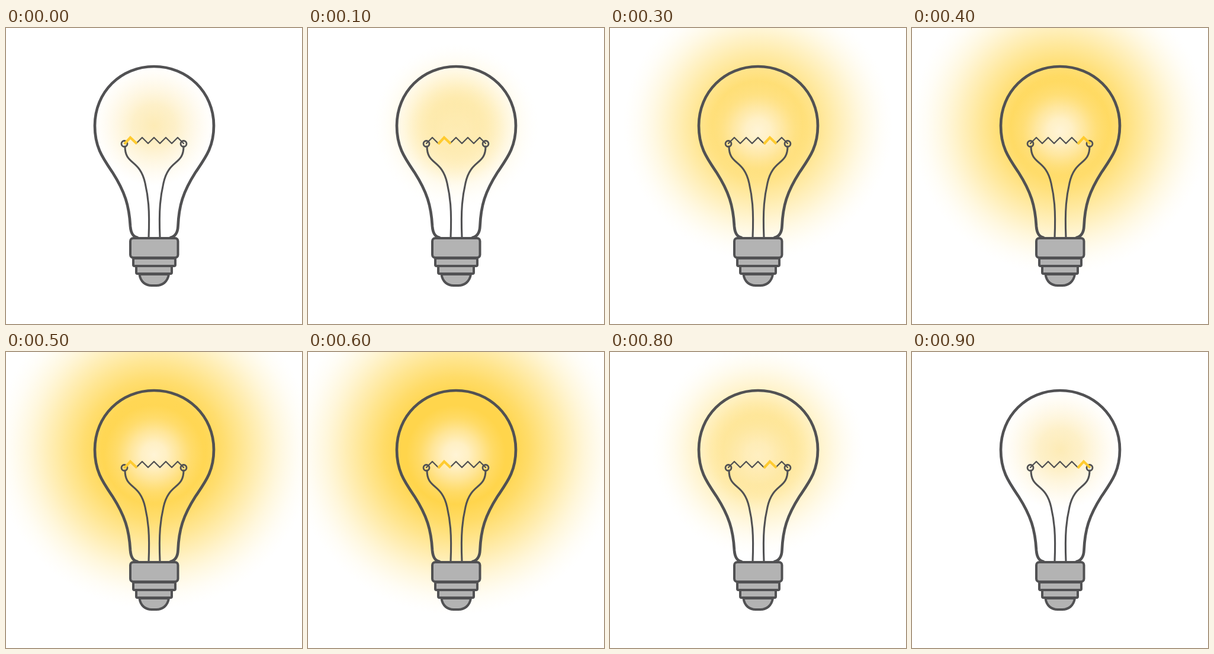
Write an HTML page that moves like this. It is 500 px wide and 500 px high and loops after 1000 ms.

```html
<!DOCTYPE html>
<html lang="en">
<head>
<meta charset="utf-8">
<title>Light bulb</title>
<style>
  html, body { margin: 0; width: 100%; height: 100%; overflow: hidden; background: #fff; }
  svg { display: block; width: 100%; height: 100%; }
  .line { fill: none; stroke: #515153; stroke-linecap: round; stroke-linejoin: round; }
  .base { fill: #b3b3b3; stroke: #515153; stroke-width: 4; stroke-linejoin: round; }
</style>
</head>
<body>
<svg viewBox="0 0 500 500">
  <defs>
    <radialGradient id="warm">
      <stop offset="0" stop-color="#fdeab2" stop-opacity=".95"/>
      <stop offset=".35" stop-color="#fdebb6" stop-opacity=".74"/>
      <stop offset=".7" stop-color="#feefc6" stop-opacity=".34"/>
      <stop offset="1" stop-color="#fff4d8" stop-opacity="0"/>
    </radialGradient>
    <radialGradient id="halo">
      <stop offset="0" stop-color="#ffd54c"/>
      <stop offset=".33" stop-color="#ffd54c"/>
      <stop offset=".44" stop-color="#ffd650" stop-opacity=".86"/>
      <stop offset=".55" stop-color="#ffd856" stop-opacity=".67"/>
      <stop offset=".66" stop-color="#ffda60" stop-opacity=".47"/>
      <stop offset=".78" stop-color="#ffdf74" stop-opacity=".26"/>
      <stop offset=".9" stop-color="#ffe690" stop-opacity=".09"/>
      <stop offset="1" stop-color="#fff0c0" stop-opacity="0"/>
    </radialGradient>
    <radialGradient id="core">
      <stop offset="0" stop-color="#fff4d6"/>
      <stop offset=".25" stop-color="#fff2ce" stop-opacity=".92"/>
      <stop offset=".5" stop-color="#ffefc4" stop-opacity=".62"/>
      <stop offset=".75" stop-color="#ffebb2" stop-opacity=".25"/>
      <stop offset="1" stop-color="#ffe8a4" stop-opacity="0"/>
    </radialGradient>
  </defs>

  <circle cx="250" cy="165" r="102" fill="url(#warm)"/>
  <circle id="glow" cx="250" cy="165" r="80" fill="url(#halo)" opacity="0"/>
  <circle id="heart" cx="250" cy="174" r="84" fill="url(#core)" opacity="0"/>

  <path class="line" stroke-width="4.7" d="M222 354C214 352 211 346 210 335C208 300 201 277 180 244C163 219 150 201 150 165C150 108 194 65 250 65C306 65 351 108 351 165C351 201 337 219 320 244C299 277 292 300 290.5 335C290 346 286 352 278 354"/>

  <g class="line" stroke-width="3.1">
    <path d="M201 200C201 232 226 221 235 262C240 284 243 305 241 354"/>
    <path d="M300 200C300 232 275 221 266 262C261 284 258 305 260 354"/>
    <circle cx="200" cy="195.5" r="5" stroke-width="2.8"/>
    <circle cx="300" cy="195.5" r="5" stroke-width="2.8"/>
  </g>

  <path class="line" stroke-width="2.3" d="M200 195l10-10 10 10 10-10 10 10 10-10 10 10 10-10 10 10 10-10 10 10"/>
  <path id="spark" d="M200 196l10-11 11 10.5" fill="none" stroke="#ffcb2f" stroke-width="4.2"/>

  <path class="base" d="M225.500 416C227 429 236 435 246 435H254C264 435 273 429 275 416Z"/>
  <rect class="base" x="220" y="402" width="60" height="13" rx="2"/>
  <rect class="base" x="215" y="389" width="71" height="13" rx="2"/>
  <rect class="base" x="210" y="355" width="80.5" height="33" rx="5"/>
</svg>
<script>
  const LOOP = 1000, STEP = 100, TEETH = 5, PITCH = 20;
  const levels = [0, .3, .58, .74, .86, .95, 1, .78, .5, 0];
  const set = (id, attrs) => {
    const el = document.getElementById(id);
    for (const name in attrs) el.setAttribute(name, attrs[name]);
  };

  function draw() {
    const step = Math.floor(performance.now() % LOOP / STEP);
    const level = levels[step];
    set('glow', { opacity: level, r: 80 + 200 * level });
    set('heart', { opacity: Math.min(1, 1.5 * level) });
    set('spark', { transform: `translate(${step % TEETH * PITCH} 0)` });
    requestAnimationFrame(draw);
  }
  draw();
</script>
</body>
</html>
```
